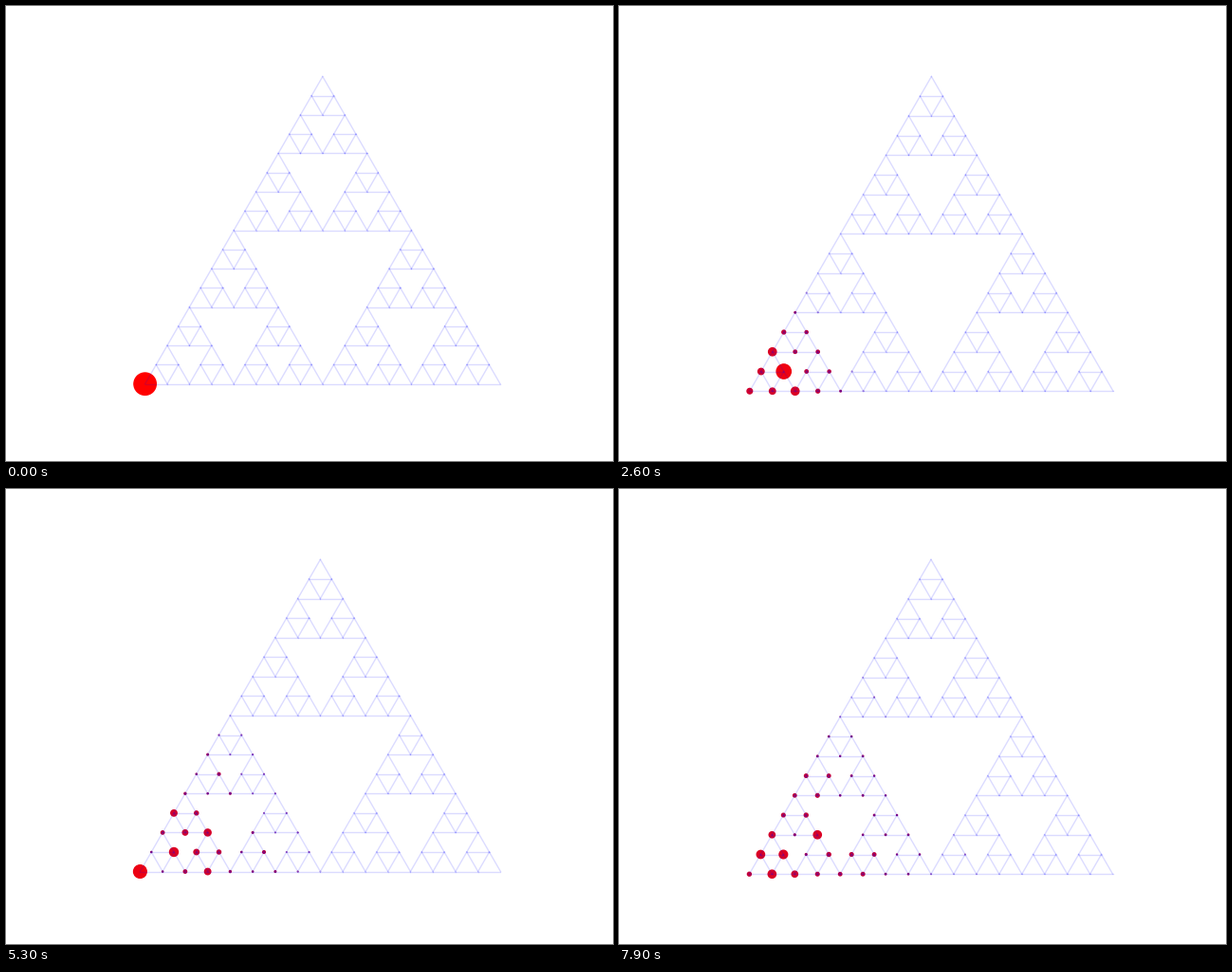
Animation of 640x480 px, one loop 8000 ms. Source, as a matplotlib script:

```python
"""Continuous-time quantum walk on a Sierpinski graph, started in one corner."""
import numpy as np
import matplotlib.pyplot as plt
from matplotlib.animation import FuncAnimation

LEVEL = 4
FRAMES = 80
INTERVAL = 100      # ms
DT = 0.05           # walk time per frame
MAX_RADIUS = 0.5    # in edge lengths
MARGIN = 0.05


def sierpinski(level):
    """Return lattice nodes and edges (index pairs) of the graph."""
    cells = [(0, 0)]
    for k in range(level):
        s = 2 ** k
        cells = [(a + da, b + db) for da, db in ((0, 0), (s, 0), (0, s))
                 for a, b in cells]
    triangles = [((a, b), (a + 1, b), (a, b + 1)) for a, b in cells]
    nodes = sorted({p for tri in triangles for p in tri})
    index = {p: i for i, p in enumerate(nodes)}
    edges = [(index[tri[i]], index[tri[j]])
             for tri in triangles for i, j in ((0, 1), (1, 2), (2, 0))]
    return np.array(nodes), np.array(edges)


nodes, edges = sierpinski(LEVEL)
x = nodes[:, 0] + nodes[:, 1] / 2
y = nodes[:, 1] * np.sqrt(3) / 2

adjacency = np.zeros((len(nodes), len(nodes)))
adjacency[edges[:, 0], edges[:, 1]] = 1
adjacency += adjacency.T
energy, modes = np.linalg.eigh(adjacency)
start = modes[0]    # the first sorted node is the lower left corner


def amplitude(t):
    return np.abs(modes @ (np.exp(-1j * energy * t) * start))


fig = plt.figure(figsize=(6.4, 4.8), dpi=100, facecolor="white")
ax = fig.add_axes([0.125, 0.11, 0.775, 0.77])
ax.axis("off")
ratio = (0.775 * 6.4) / (0.77 * 4.8)

ax.plot(x[edges.T], y[edges.T], color="blue", alpha=0.14, lw=1, zorder=2,
        solid_capstyle="projecting", clip_on=False)
discs = [ax.add_patch(plt.Circle(p, 0, lw=1, zorder=1, clip_on=False))
         for p in zip(x, y)]


def fit_view(r):
    """Centre the discs' bounding box and fit its height."""
    left, right = (x - r).min(), (x + r).max()
    low, high = (y - r).min(), (y + r).max()
    half = (high - low) * (0.5 + MARGIN)
    cx, cy = (left + right) / 2, (low + high) / 2
    ax.set_xlim(cx - half * ratio, cx + half * ratio)
    ax.set_ylim(cy - half, cy + half)


def update(frame):
    amp = np.clip(amplitude(frame * DT), 0, 1)
    radius = MAX_RADIUS * amp
    red = amp ** (1 / 7)
    alpha = np.minimum(1, 30 * amp)
    for disc, r, c, a in zip(discs, radius, red, alpha):
        disc.set_visible(a > 0.01)
        disc.set_radius(r)
        disc.set_color((c, 0, 1 - c, a))
    fit_view(radius)
    return discs


anim = FuncAnimation(fig, update, frames=FRAMES, interval=INTERVAL,
                     init_func=lambda: update(0), repeat=True,
                     repeat_delay=0, blit=False)
plt.show()
```
